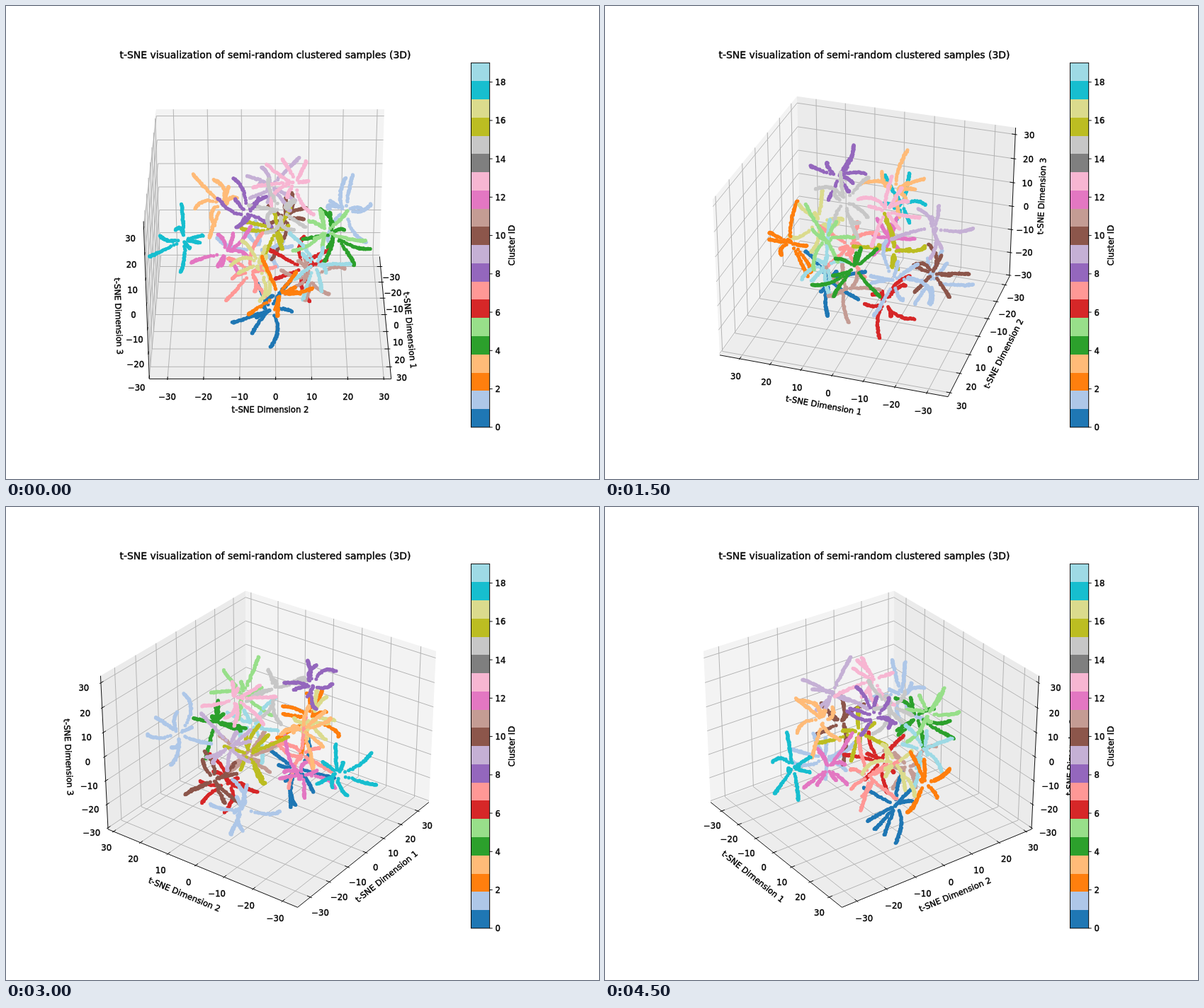
An HTML page with a canvas for the animation above (5000 ms loop, 837 px wide and 669 px high).

```html
<!DOCTYPE html>
<html lang="en">
<head>
<meta charset="utf-8">
<title>Rotating 3D scatter</title>
<style>
html, body { margin: 0; width: 100%; height: 100%; overflow: hidden; background: #fff; }
canvas { display: block; width: 837px; height: 669px; }
</style>
</head>
<body>
<canvas id="stage" width="837" height="669"></canvas>
<script>
const ctx = document.getElementById('stage').getContext('2d');

// Colour and centre of each cluster, in hundredths of a box unit.
const CLUSTERS = [
  ['#1f77b4', 23, 0, -27], ['#aec7e8', -31, -6, -23], ['#aec7e8', -25, 39, 3],
  ['#ff7f0e', 41, 4, -7], ['#ffbb78', -6, -24, 17], ['#2ca02c', -3, 32, 2],
  ['#98df8a', 13, 27, 13], ['#d62728', -14, 17, -25], ['#ff9896', 14, -10, -11],
  ['#9467bd', 20, -12, 27], ['#c5b0d5', -33, 0, 13], ['#8c564b', -36, 9, -8],
  ['#c49c94', 6, 20, -19], ['#e377c2', -4, -23, -10], ['#f7b6d2', -13, 13, 26],
  ['#7f7f7f'], ['#c7c7c7', 11, 6, 23], ['#bcbd22', -14, 3, -2],
  ['#dbdb8d', 29, -6, 3], ['#17becf', -4, -44, -2], ['#9edae5', 16, 22, -5]
];
const PALETTE = [...new Set(CLUSTERS.map(c => c[0]))];
const ARMS = 8;

let seed = 11;
function rand() {
  seed = (seed * 16807) % 2147483647;
  return seed / 2147483647;
}

function randomDirection() {
  const z = rand() * 2 - 1, a = rand() * Math.PI * 2, r = Math.sqrt(1 - z * z);
  return [r * Math.cos(a), r * Math.sin(a), z];
}

const dot = (a, b) => a[0] * b[0] + a[1] * b[1] + a[2] * b[2];

// Picks the candidate that keeps most clear of the arms already placed.
function freeDirection(used) {
  let best, bestScore = 2;
  for (let i = 0; i < 8; i++) {
    const dir = randomDirection();
    const score = Math.max(-1, ...used.map(u => dot(u, dir)));
    if (score < bestScore) { best = dir; bestScore = score; }
  }
  return best;
}

// Dots are loose near the centre and close up towards the tip.
function arm(color, from, dir) {
  const length = 0.1 + rand() * 0.13, bend = randomDirection();
  const amount = length * (rand() - 0.5) * 0.5, count = Math.round(length * 170);
  return Array.from({ length: count }, (_, i) => {
    const t = Math.sqrt((i + 1) / count), curve = 4 * t * (1 - t) * amount;
    const at = from.map((c, k) => c + dir[k] * length * t + bend[k] * curve + (rand() - 0.5) * 0.006);
    return { color, at };
  });
}

function cluster([color, ...centre]) {
  if (!centre.length) return [];
  const from = centre.map(v => v / 100), dirs = [];
  while (dirs.length < ARMS) dirs.push(freeDirection(dirs));
  return dirs.flatMap(dir => arm(color, from, dir));
}

const points = CLUSTERS.flatMap(cluster);

const HALF = [0.59524, 0.59524, 0.44643];
const AXES = [
  { name: 't-SNE Dimension 1', mid: 0, span: 36.6, tickDir: 1, pane: '#f3f3f3' },
  { name: 't-SNE Dimension 2', mid: -1.5, span: 33.55, tickDir: 0, pane: '#ebebeb' },
  { name: 't-SNE Dimension 3', mid: 1.07, span: 31.7, tickDir: 0, pane: '#ededed' }
];
const TICKS = [-30, -20, -10, 0, 10, 20, 30];
const ELEV = Math.PI / 6, LINE = 0.93;
let azim = 0;

function project([x, y, z]) {
  const right = y * Math.cos(azim) - x * Math.sin(azim);
  const toward = x * Math.cos(azim) + y * Math.sin(azim);
  const up = z * Math.cos(ELEV) - toward * Math.sin(ELEV);
  const depth = toward * Math.cos(ELEV) + z * Math.sin(ELEV);
  const scale = 2784 / (10 - depth);
  return { x: 373 + right * scale, y: 331.2 - up * scale, depth };
}

// Corner coordinates run from -1 to 1 along each side of the box.
const corner = p => project(p.map((v, k) => v * HALF[k]));

function path(list) {
  ctx.beginPath();
  list.map(corner).forEach(p => ctx.lineTo(p.x, p.y));
}

function stroke(list, color) {
  path(list);
  ctx.strokeStyle = color;
  ctx.lineWidth = LINE;
  ctx.stroke();
}

function text(str, x, y, { size = 11.63, align = 'center', angle = 0, drop = 0 } = {}) {
  ctx.save();
  ctx.translate(x, y);
  ctx.rotate(angle);
  ctx.font = size + 'px "DejaVu Sans", sans-serif';
  ctx.textAlign = align;
  ctx.fillStyle = ctx.strokeStyle = '#000';
  ctx.lineWidth = 0.4;
  ctx.fillText(str, 0, drop);
  ctx.strokeText(str, 0, drop);
  ctx.restore();
}

const number = v => (v < 0 ? '\u2212' : '') + Math.abs(v);

function drawBox() {
  const nx = Math.cos(azim) >= 0 ? 1 : -1, ny = Math.sin(azim) >= -1e-9 ? 1 : -1;
  const panes = [
    [[-nx, -1, -1], [-nx, 1, -1], [-nx, 1, 1], [-nx, -1, 1]],
    [[-1, -ny, -1], [1, -ny, -1], [1, -ny, 1], [-1, -ny, 1]],
    [[-1, -1, -1], [1, -1, -1], [1, 1, -1], [-1, 1, -1]]
  ];
  const gridLines = [
    t => [[t, ny, -1], [t, -ny, -1], [t, -ny, 1]],
    t => [[nx, t, -1], [-nx, t, -1], [-nx, t, 1]],
    t => [[nx, -ny, t], [-nx, -ny, t], [-nx, ny, t]]
  ];
  panes.forEach((pane, k) => {
    path(pane);
    ctx.fillStyle = AXES[k].pane;
    ctx.fill();
  });
  const place = (axis, v) => (v - axis.mid) / axis.span;
  AXES.forEach((axis, k) => TICKS.forEach(v => stroke(gridLines[k](place(axis, v)), '#b0b0b0')));

  AXES.forEach((axis, k) => {
    const edge = t => gridLines[k](t)[0];
    const outward = (t, by) => edge(t).map((v, i) => i === k ? v : v * (1 + by));
    stroke([edge(-1), edge(1)], '#000');
    for (const v of TICKS) {
      const t = place(axis, v);
      const tickEnd = by => edge(t).map((c, i) => i === axis.tickDir ? c * (1 + by) : c);
      stroke([tickEnd(0.016), tickEnd(-0.032)], '#000');
      const p = corner(outward(t, 0.0995));
      text(number(v), p.x, p.y, { drop: 9.6 });
    }
    const a = corner(edge(-1)), b = corner(edge(1)), p = corner(outward(0, 0.2166));
    const angle = Math.atan((b.y - a.y) / (b.x - a.x));
    text(axis.name, p.x, p.y, { angle, drop: 3.2 });
  });
}

function drawPoints() {
  points.map(p => ({ color: p.color, ...project(p.at) }))
    .sort((a, b) => a.depth - b.depth)
    .forEach(p => {
      ctx.fillStyle = p.color;
      ctx.beginPath();
      ctx.arc(p.x, p.y, 2.5, 0, Math.PI * 2);
      ctx.fill();
    });
}

function drawColorbar() {
  const left = 656.5, width = 26.2, top = 80.5, height = 515.3, bottom = top + height;
  const cell = height / PALETTE.length;
  PALETTE.slice().reverse().forEach((color, i) => {
    const y = Math.round(top + i * cell);
    ctx.fillStyle = color;
    ctx.fillRect(left, y, width, bottom - y);
  });
  ctx.strokeStyle = '#000';
  ctx.lineWidth = LINE;
  ctx.strokeRect(left, top, width, height);
  for (let v = 0; v <= 18; v += 2) {
    const y = bottom - height * v / 19;
    ctx.strokeStyle = '#000';
    ctx.lineWidth = LINE;
    ctx.beginPath();
    ctx.moveTo(left + width, y);
    ctx.lineTo(left + width + 4, y);
    ctx.stroke();
    text(String(v), 690.5, y, { align: 'left', drop: 4.6 });
  }
  text('Cluster ID', 714.5, 338.5, { angle: -Math.PI / 2, drop: 3.5 });
}

function draw(step) {
  azim = step * Math.PI / 5;
  ctx.fillStyle = '#fff';
  ctx.fillRect(0, 0, 837, 669);
  drawBox();
  drawPoints();
  text('t-SNE visualization of semi-random clustered samples (3D)', 366, 73.5, { size: 13.95 });
  drawColorbar();
}

let shown = -1;
function tick() {
  const step = Math.floor(performance.now() % 5000 / 500);
  if (step !== shown) draw(shown = step);
  requestAnimationFrame(tick);
}
tick();
</script>
</body>
</html>
```
